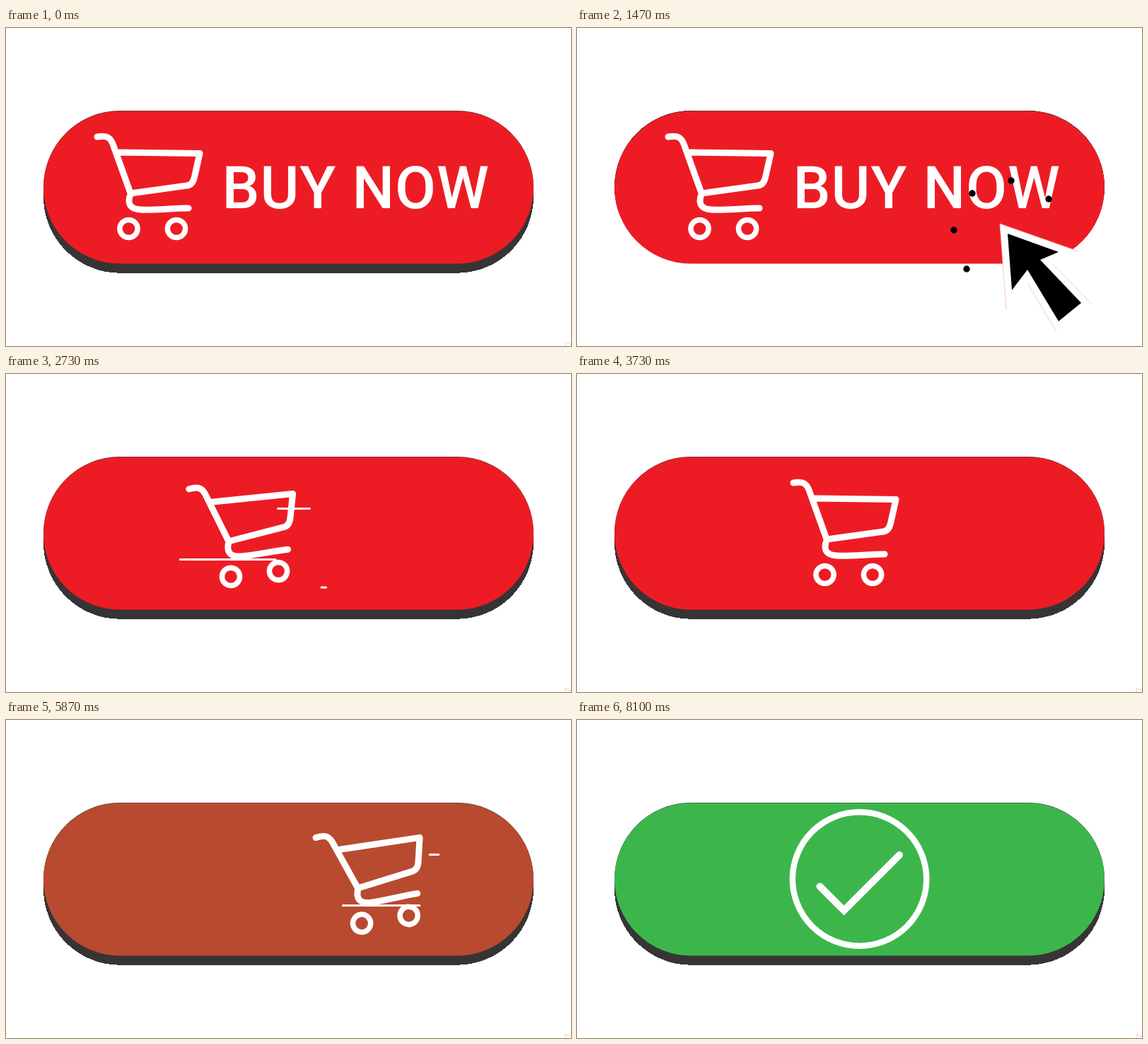
Write an HTML page that moves like this. It is 799 px wide and 450 px high and loops after 8130 ms.

```html
<!DOCTYPE html>
<html lang="en">
<head>
<meta charset="utf-8">
<title>Buy now button</title>
<style>
  html, body { margin: 0; width: 100%; height: 100%; overflow: hidden; background: #fff; }
  svg { display: block; width: 100%; height: 100%; }
  .ink { fill: none; stroke: #fff; }
  text { font: 500 84px Roboto, Arial, sans-serif; letter-spacing: 1px; fill: #fff; }
</style>
</head>
<body>
<svg viewBox="0 0 799 450">
  <defs>
    <rect id="pill" x="53" y="117" width="693" height="216" rx="108"/>
    <clipPath id="inside"><use href="#pill"/></clipPath>
  </defs>

  <use id="shadow" href="#pill" fill="#373435" shape-rendering="crispEdges"/>
  <use href="#pill" fill="#373435"/>
  <use id="face" href="#pill" y="0.5"/>
  <text id="label" x="305.5" y="254.7">BUY NOW</text>

  <g clip-path="url(#inside)">
    <g id="cart" class="ink" stroke-width="9" stroke-linecap="round" stroke-linejoin="round">
      <path d="M129 154C142 152 147 154 151 164L176.5 235M160 176L274 177.5L266.5 211Q264 222 256 223L176.5 234C171 247 174 256 190 257C210 258 235 255 258 255"/>
      <g stroke-width="7.5">
        <circle cx="173.5" cy="284" r="12.6"/>
        <circle cx="241" cy="284" r="12.6"/>
      </g>
    </g>
    <g id="streaks" class="ink" stroke-width="3" stroke-linecap="round"></g>
  </g>

  <circle id="ring" class="ink" cx="399.5" cy="225" r="94.7" stroke-width="8.5"
    pathLength="1" transform="rotate(-90 399.5 225)"/>
  <path id="tick" class="ink" d="M343.5 235.5L377.5 269.5L456 191" stroke-width="10"
    stroke-linecap="round" stroke-miterlimit="10"/>

  <g id="dots"></g>
  <g id="cursor">
    <path fill="#fff" d="M598 277L607 399L637 361L678 430L728 391L673 334L709 316Z"/>
    <path fill="none" stroke="#f7b9bd" stroke-width=".8" d="M607 399L598 277L709 316M637 361L678 430M673 334L728 391"/>
    <path d="M609 291L615 371L637 342L681 415L713 389L655 328L681 317Z"/>
  </g>
</svg>
<script>
const LOOP = 8130;
const REST = 177;
const RED = [237, 28, 36], GREEN = [60, 182, 75];
const $ = id => document.getElementById(id);

const quadIn = p => p * p;
const cubicOut = p => 1 - (1 - p) ** 3;
const sine = p => (1 - Math.cos(Math.PI * p)) / 2;
const cubic = p => p < .5 ? 4 * p ** 3 : 1 - 4 * (1 - p) ** 3;
const span = (t, start, length, ease = p => p) =>
  ease(Math.min(1, Math.max(0, (t - start) / length)));

// Value at time t from [time, value] steps
function track(steps, t, ease) {
  let [t0, v0] = steps[0];
  for (const [t1, v1] of steps) {
    if (t < t1) return v0 + (v1 - v0) * span(t, t0, t1 - t0, ease);
    [t0, v0] = [t1, v1];
  }
  return v0;
}

const EXIT = 6153;
const CART_X = [[0, 0], [1960, 0], [2501, -60], [2853, REST], [5100, REST], [5642, 117], [EXIT, 680]];
const CART_TILT = [[0, 0], [2500, 0], [2640, -10], [2870, 0], [5640, 0], [5870, -9.3], [6000, -12]];
const CURSOR = [[0, 1], [30, 1], [830, 0], [1690, 0], [2500, 1]];
const PRESS = [[0, 0], [700, 0], [900, 1], [1690, 1], [1900, 0]];

// y, right, left, head start, head length, tail start, tail length
const STREAKS = [
  [190.5, 470.5, 300, 225, 219, 425, 245],
  [262.5, 460, 216, 0, 402, 196, 367],
  [302, 493.5, 350, 295, 180, 450, 220]
];
const BURSTS = [2390, 3060, 3710, 4360, 5580];
const TIP = [598, 277];
const DOTS = [[-65, 9], [-47, 64], [-39, -43], [16, -61], [69, -35]];

function add(parent, tag, attrs) {
  const el = document.createElementNS("http://www.w3.org/2000/svg", tag);
  for (const k in attrs) el.setAttribute(k, attrs[k]);
  return parent.appendChild(el);
}
const set = (id, name, value) => $(id).setAttribute(name, value);
const show = (el, on) => { el.style.display = on ? "" : "none"; };

const streaks = STREAKS.map(([y]) => add($("streaks"), "line", { y1: y, y2: y }));
const dots = DOTS.map(() => add($("dots"), "circle", {}));
const tickLength = $("tick").getTotalLength();

function drawStreaks(t, x) {
  const start = BURSTS.filter(b => b <= t).pop();
  STREAKS.forEach(([, right, left, h, hLen, q, qLen], i) => {
    const run = right - left, s = t - start;
    const head = right - run * span(s, h, hLen, quadIn);
    const tail = right - run * span(s, q, qLen, quadIn);
    const on = tail - head > 3;
    show(streaks[i], on);
    if (!on) return;
    streaks[i].setAttribute("x1", head + 1.5 + x - REST);
    streaks[i].setAttribute("x2", tail - 1.5 + x - REST);
  });
}

function drawDots(t) {
  const out = span(t, 1000, 470, cubicOut);
  const r = 4.7 * span(t, 1000, 100) * (1 - span(t, 1530, 140));
  show($("dots"), r > 0);
  DOTS.forEach(([dx, dy], i) => {
    dots[i].setAttribute("cx", TIP[0] + dx * out);
    dots[i].setAttribute("cy", TIP[1] + dy * out);
    dots[i].setAttribute("r", r);
  });
}

function draw(t) {
  const away = track(CURSOR, t, sine);
  set("cursor", "transform", `translate(${193 * away} ${168 * away})`);
  set("shadow", "y", 13.7 * (1 - track(PRESS, t, sine)));

  const mix = span(t, 5630, 800);
  const rgb = RED.map((c, i) => Math.round(c + (GREEN[i] - c) * mix));
  set("face", "fill", `rgb(${rgb})`);
  set("label", "opacity", 1 - span(t, 1950, 400));

  const x = track(CART_X, t, cubic);
  set("cart", "transform", `translate(${x} 0) rotate(${track(CART_TILT, t, sine)} 201 225)`);
  show($("cart"), t < EXIT);
  drawStreaks(t, x);
  drawDots(t);

  const ring = span(t, 6615, 855, sine);
  show($("ring"), ring > 0);
  set("ring", "stroke-dasharray", ring < 1 ? `${ring} 2` : "none");
  const tick = span(t, 7240, 860, sine);
  show($("tick"), tick > 0);
  set("tick", "stroke-dasharray", tick < 1 ? `${tickLength * tick} 400` : "none");
}

const begin = performance.now();
function frame() {
  draw((performance.now() - begin) % LOOP);
  requestAnimationFrame(frame);
}
frame();
</script>
</body>
</html>
```
